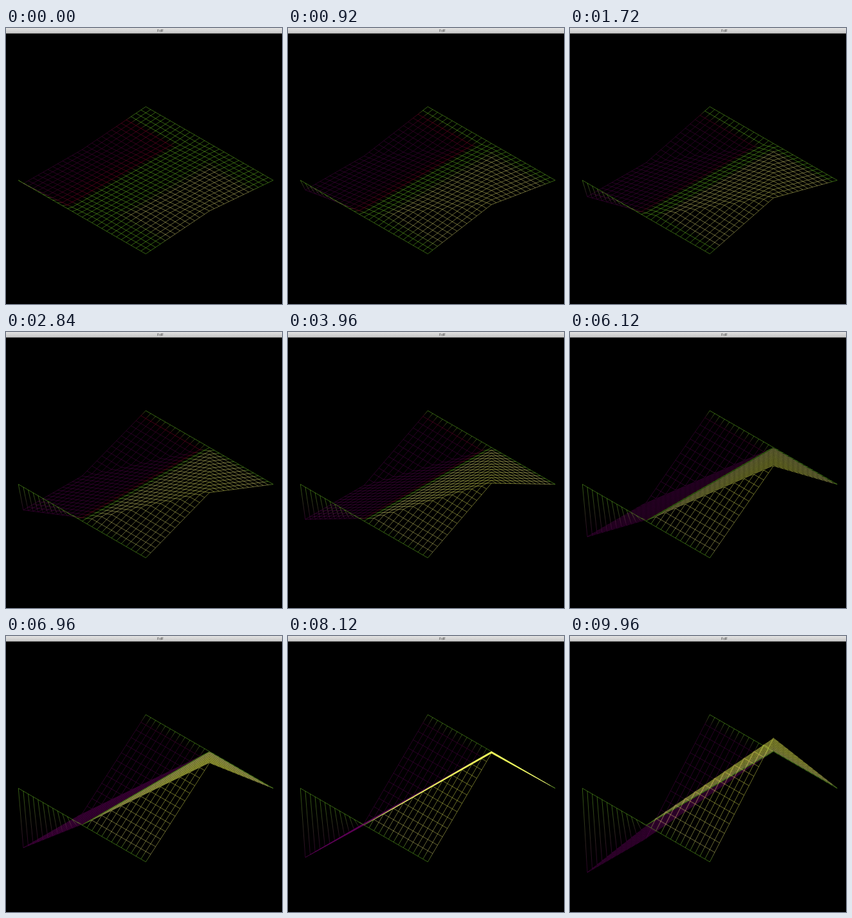
Recreate the animation shown at these times as an HTML page with a canvas. Size 429 by 429 pixels, loop 10000 ms.

```html
<!DOCTYPE html>
<html lang="en">
<head>
<meta charset="utf-8">
<title>FdF</title>
<style>
  html, body { margin: 0; width: 100%; height: 100%; overflow: hidden; background: #000; }
  canvas { position: absolute; left: 0; top: 0; }
  header {
    position: absolute; left: 0; top: 0; width: 429px; height: 8px;
    background: linear-gradient(#e2e2e2, #c8c8c8);
    border-bottom: 1px solid #666;
  }
  header span {
    position: absolute; left: 220px; width: 40px; top: 0;
    font: 6px/9px "Open Sans", Lato, sans-serif;
    text-align: center; color: #333;
  }
</style>
</head>
<body>
<canvas id="view" width="429" height="429"></canvas>
<header><span>FdF</span></header>
<script>
const ctx = document.getElementById('view').getContext('2d');
const CELLS = 26, HALF = CELLS / 2;
const LEFT = { x: 19.3, y: 236.7 };
const DX = 198 / CELLS, DY = 114.4 / CELLS;
const LOOP = 10000, TICK = 40;
const HOLDS = [101, 134, 210]; // ticks that repeat the previous pose

// Screen offset (down is positive) -> line colour
const RAMP = [
  [-60, 238, 246, 85],
  [-12, 236, 234, 118],
  [-3.6, 232, 228, 122],
  [-2.4, 120, 218, 40],
  [2.5, 120, 218, 40],
  [2.8, 160, 0, 45],
  [6, 98, 0, 66],
  [11, 88, 0, 80],
  [60, 94, 0, 88]
];

function colour(d) {
  const last = RAMP.length - 1;
  if (d <= RAMP[0][0]) return rgb(RAMP[0], RAMP[0], 0);
  if (d >= RAMP[last][0]) return rgb(RAMP[last], RAMP[last], 0);
  const k = RAMP.findIndex(s => s[0] > d);
  const a = RAMP[k - 1], b = RAMP[k];
  return rgb(a, b, (d - a[0]) / (b[0] - a[0]));
}

function rgb(a, b, f) {
  const mix = c => Math.round(a[c] + (b[c] - a[c]) * f);
  return `rgb(${mix(1)},${mix(2)},${mix(3)})`;
}

// Relief from -1 (peak) to 1 (pit): a roof on one half, a trough on the other
function relief(i, j) {
  if (i === 0) return 0;
  const side = HALF - j;
  return side >= 0
    ? Math.min(CELLS - i, side) / HALF
    : -Math.min(i, CELLS - i, -side) / HALF;
}

function stepAt(t) {
  const k = Math.floor(t / TICK);
  if (k < 10) return Math.min(k, 5);
  return k - 4 - HOLDS.filter(h => h <= k).length;
}

function segment(a, b) {
  if (a.c === b.c) {
    ctx.strokeStyle = a.c;
  } else {
    const g = ctx.createLinearGradient(a.x, a.y, b.x, b.y);
    g.addColorStop(0, a.c);
    g.addColorStop(1, b.c);
    ctx.strokeStyle = g;
  }
  ctx.beginPath();
  ctx.moveTo(a.x, a.y);
  ctx.lineTo(b.x, b.y);
  ctx.stroke();
}

function draw(step) {
  const amp = 9.6 + 0.519 * step;
  const grid = [];
  for (let i = 0; i <= CELLS; i++) {
    grid.push([]);
    for (let j = 0; j <= CELLS; j++) {
      const d = amp * relief(i, j);
      grid[i].push({
        x: LEFT.x + DX * (i + j),
        y: LEFT.y + DY * (j - i) + d,
        c: colour(d)
      });
    }
  }
  ctx.fillStyle = '#000';
  ctx.fillRect(0, 0, 429, 429);
  ctx.lineWidth = 0.44;
  for (let i = CELLS; i >= 0; i--) {
    for (let j = 0; j <= CELLS; j++) {
      if (j < CELLS) segment(grid[i][j], grid[i][j + 1]);
      if (i > 0) segment(grid[i][j], grid[i - 1][j]);
    }
  }
}

let shown = -1;
const start = performance.now();
function frame() {
  const step = stepAt((performance.now() - start) % LOOP);
  if (step !== shown) draw(shown = step);
  requestAnimationFrame(frame);
}
frame();
</script>
</body>
</html>
```
